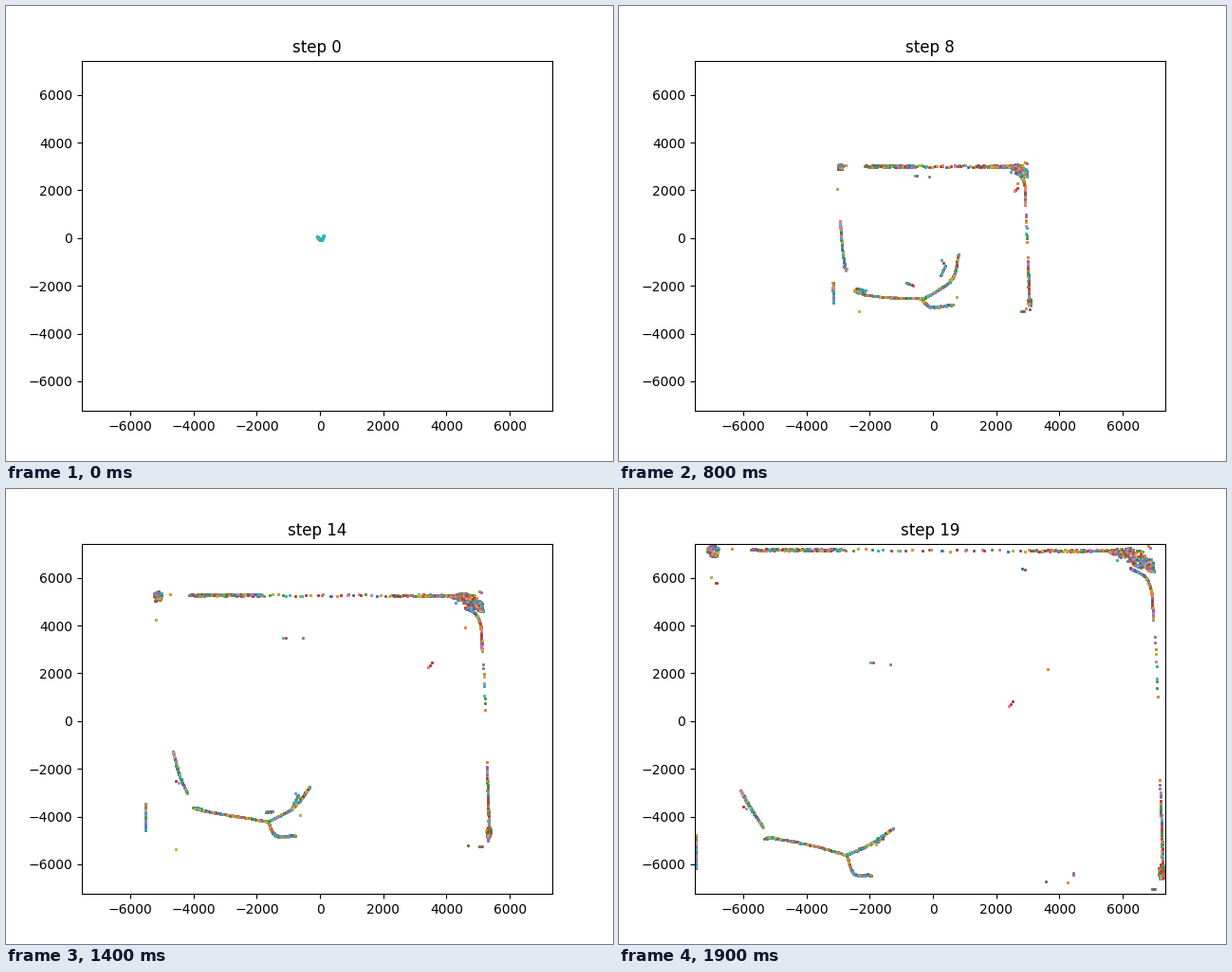
A matplotlib script for the animation above (2000 ms loop, 640x480 px).

```python
import numpy as np
import matplotlib.pyplot as plt
from matplotlib.animation import FuncAnimation

STEPS = np.arange(20)
EARLY, LAST = 4, 19
GROUPS, COPIES = 200, 3
XLIM, YLIM = (-7534, 7346), (-7244, 7436)
rng = np.random.default_rng(7)
tracks = []


def curve(pts, t):
    """Catmull-Rom spline through pts, t in 0..1."""
    p = np.array(pts, float)
    p = np.vstack([2 * p[0] - p[1], p, 2 * p[-1] - p[-2]])
    s = t * (len(p) - 3)
    i = np.minimum(s.astype(int), len(p) - 4)
    u = (s - i)[:, None]
    a, b, c, d = p[i], p[i + 1], p[i + 2], p[i + 3]
    return b + 0.5 * u * (c - a + u * (2 * a - 5 * b + 4 * c - d
                                       + u * (3 * (b - c) + d - a)))


def home(pose):
    """Tiny tick shape in which every point starts."""
    t = np.clip((pose[:, 0] - 279) / 104, 0, 1)
    return curve([(328, 243), (332, 247), (335, 242)], t)


def drift(poses, times):
    """Straight drift from home through each pose in turn."""
    poses = np.array([home(poses[0]), *poses])
    times = np.array([0, *times])
    i = np.clip(np.searchsorted(times, STEPS, "right") - 1, 0, len(times) - 2)
    f = (STEPS - times[i]) / (times[i + 1] - times[i])
    return poses[i] + (poses[i + 1] - poses[i]) * f[:, None, None]


def strand(n, *shapes, times=(EARLY, LAST), skew=1.0, thick=0.4):
    """n points strung along a curve that changes shape over time."""
    t = ((np.arange(n) + rng.random(n)) / n) ** skew
    noise = rng.uniform(-1, 1, (n, 2)) * (0.3, thick)
    fade = np.minimum(STEPS / EARLY, 1)[:, None, None]
    tracks.append(drift([curve(s, t) for s in shapes], times) + noise * fade)


def band(n, outer, inner):
    """Points filling the area between two curves."""
    t, s = rng.random(n), rng.random((n, 1))
    poses = [curve(o, t) * s + curve(i, t) * (1 - s) for o, i in zip(outer, inner)]
    tracks.append(drift(poses, (EARLY, LAST)))


def cluster(n, end, size):
    """Disc that widens while its centre leaves the middle."""
    a, r = rng.uniform(0, 2 * np.pi, n), np.sqrt(rng.random(n))
    disc = np.column_stack([r * np.cos(a), r * np.sin(a)]) * size
    start = (331, 245) + (np.array(end) - (331, 245)) * EARLY / LAST
    poses = [np.tile(start, (n, 1)), np.tile(end, (n, 1))]
    tracks.append(drift(poses, (EARLY, LAST)) + disc * STEPS[:, None, None] / LAST)


def loose(n, start, end, turn=EARLY, gap=(2, 0)):
    """A few single points that change course at step turn."""
    offs = np.arange(n)[:, None] * gap
    tracks.append(drift([offs + start, offs + end], (turn, LAST)))


# top edge: dense ends, sparse middle
strand(120, [(302, 207), (338, 207)], [(139, 64), (237, 64)], thick=1.2)
strand(30, [(338, 207), (355, 207)], [(237, 64), (430, 65)], thick=1.2)
strand(75, [(355, 207), (374, 207)], [(430, 65), (516, 65)], skew=0.8, thick=1)

# top-left corner
cluster(75, (99, 65), (6.2, 6.6))
loose(1, (282, 206), (119, 63))
loose(1, (279, 229), (97, 93))
loose(2, (133, 100), (102, 99), turn=16, gap=(1, 0))

# top-right corner
band(250,
     [[(372, 207), (377, 205), (381, 207), (381, 213)],
      [(514, 65), (540, 62), (560, 72), (565, 88)]],
     [[(372, 207), (374, 209), (377, 212), (380, 214)],
      [(518, 67), (534, 75), (548, 83), (562, 87)]])
loose(2, (381, 203), (558, 60), gap=(2, 1.5))
loose(1, (372, 211), (525, 75))
loose(2, (420, 94), (425, 84), turn=16, gap=(3, 1))

# right edge
strand(85, [(374, 209), (377, 212), (379, 220), (379, 236)],
       [(538, 83), (554, 92), (561, 108), (563, 138)])
strand(10, [(379, 241), (380, 262)], [(565, 149), (568, 224)])
strand(55, [(380, 249), (381, 281)], [(570, 302), (573, 396)], skew=0.6)

# bottom-right corner
cluster(75, (572, 404), (3.4, 8))
loose(3, (374, 286), (562, 422), gap=(1.5, 0))
loose(1, (494, 368), (450, 414), turn=13)
loose(1, (499, 377), (473, 415), turn=14)
loose(2, (508, 369), (479, 405), turn=14, gap=(0, 2))

# left edge
strand(75, [(279, 208), (279, 257)], [(233, 227), (236, 262), (239, 279)],
       [(128, 318), (139, 337), (152, 357)], times=(EARLY, 8, LAST))
strand(32, [(278, 265), (279, 281)], [(81, 364), (81, 400)])
loose(2, (237, 275), (131, 335), turn=8, gap=(3, 2))
loose(1, (303, 284), (117, 428))

# bottom branches
strand(12, [(284, 272), (296, 277)], [(153, 369), (162, 367)])
strand(110, [(281, 276), (292, 281), (318, 282), (350, 280)],
       [(157, 367), (185, 372), (212, 378), (239, 386)])
strand(90, [(340, 279), (360, 262), (348, 229)],
       [(322, 308), (350, 289), (358, 262)],
       [(239, 386), (262, 376), (289, 358)], times=(EARLY, 8, LAST))
strand(70, [(347, 280), (359, 285), (384, 281)],
       [(240, 387), (248, 406), (266, 407)], thick=0.8)

# stray bits inside
strand(10, [(320, 241), (325, 248)], [(344, 273), (339, 285)],
       [(279, 364), (272, 373)], times=(EARLY, 8, LAST))
strand(9, [(330, 265), (321, 258)], [(256, 378), (250, 382)])
loose(2, (340, 268), (276, 366), turn=8, gap=(2, 3))
loose(1, (356, 307), (271, 375), turn=8)
loose(2, (303, 146), (265, 183), turn=12, gap=(3, 0))
loose(1, (324, 146), (286, 185), turn=12)
loose(3, (458, 172), (411, 229), turn=12, gap=(2, -2.5))
loose(1, (484, 146), (452, 190), turn=14)

# copies in other colours overlap at every spot
track = np.repeat(np.concatenate(tracks, axis=1), COPIES, axis=1)
track = track[:, rng.permutation(track.shape[1])]

fig, ax = plt.subplots(figsize=(6.4, 4.8), dpi=100)
ax.set_xlim(XLIM)
ax.set_ylim(YLIM)
title = ax.set_title("step 0")
# stage pixels to data units
xs = XLIM[0] + (track[..., 0] - 80) / 496 * (XLIM[1] - XLIM[0])
ys = YLIM[1] - (track[..., 1] - 57.6) / 369.6 * (YLIM[1] - YLIM[0])
lines = [ax.plot([], [], "o", ms=1, color=f"C{g % 10}")[0] for g in range(GROUPS)]


def draw(k):
    title.set_text(f"step {k}")
    for g, line in enumerate(lines):
        line.set_data(xs[k, g::GROUPS], ys[k, g::GROUPS])
    return [title, *lines]


anim = FuncAnimation(fig, draw, frames=len(STEPS), interval=100, repeat=True)
plt.show()
```
